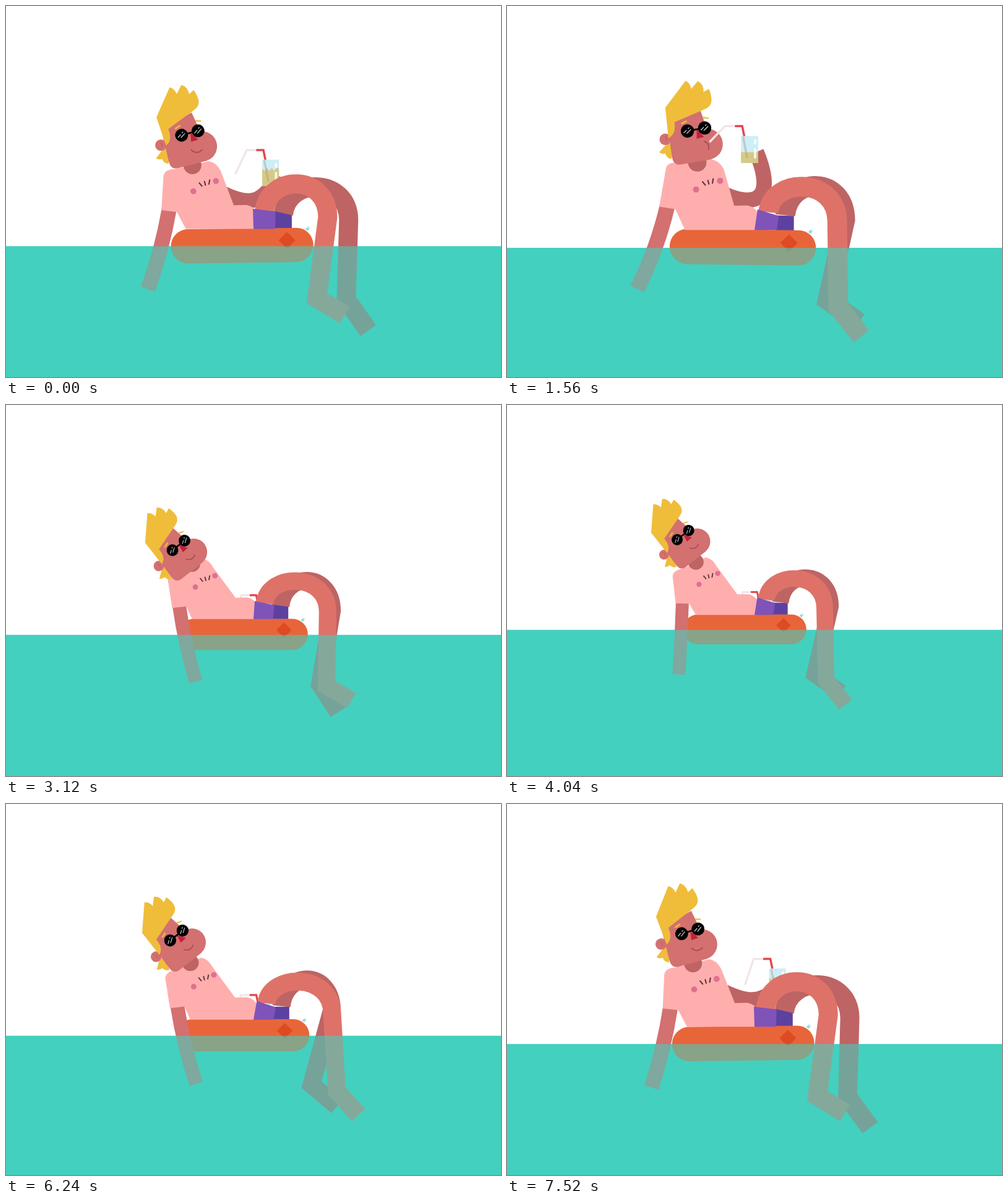
Recreate the animation shown at these times as an HTML page with a canvas. Size 800 px wide and 600 px high, loop 7.56 s.

```html
<!DOCTYPE html>
<html lang="en">
<head>
<meta charset="utf-8">
<title>Floating with a drink</title>
<style>
html, body { margin: 0; width: 100%; height: 100%; overflow: hidden; background: #fff; }
canvas { display: block; width: 800px; height: 600px; }
</style>
</head>
<body>
<canvas id="stage" width="800" height="600"></canvas>
<script>
const LOOP = 7560, KICK = LOOP / 3, SWING = LOOP / 2, TAU = Math.PI * 2;
const ctx = document.getElementById('stage').getContext('2d');
const C = {
  water: '#44d1c0', skin: '#d37070', near: '#de7269', far: '#be6464', shirt: '#ffaeae',
  hair: '#efbd3a', ring: '#e8653a', patch: '#de4a22', shorts: '#7f53b8', farShorts: '#5d41a0',
  red: '#e04850', straw: '#f2e4e6', nose: '#c5203a', blush: '#df7090'
};

const mix = (a, b, k) => a + (b - a) * k;
const clamp = v => Math.max(0, Math.min(1, v));
const smooth = v => (v = clamp(v), v * v * (3 - 2 * v));
const since = (t, from) => (t - from + LOOP) % LOOP;

// Eases up after `rise`, holds across the loop's seam, eases down after `fall`.
function hold(t, rise, riseTime, fall, fallTime) {
  return t >= fall ? Math.max(1 - smooth((t - fall) / fallTime), smooth((t - rise) / riseTime))
    : smooth((t + LOOP - rise) / riseTime);
}

function fill(color, draw) {
  ctx.beginPath();
  draw();
  ctx.fillStyle = color;
  ctx.fill();
}
function stroke(color, width, draw, cap = 'butt') {
  ctx.beginPath();
  draw();
  ctx.lineWidth = width;
  ctx.lineCap = cap;
  ctx.strokeStyle = color;
  ctx.stroke();
}
function trace(...p) {
  ctx.moveTo(p[0], p[1]);
  for (let i = 2; i < p.length; i += 2) ctx.lineTo(p[i], p[i + 1]);
}
const poly = (color, ...p) => fill(color, () => trace(...p));
const line = (color, width, ...p) => stroke(color, width, () => trace(...p));
const disc = (color, x, y, r) => fill(color, () => ctx.arc(x, y, r, 0, TAU));
function placed(x, y, degrees, draw) {
  ctx.save();
  ctx.translate(x, y);
  ctx.rotate(degrees / 360 * TAU);
  draw();
  ctx.restore();
}

// Scenery units: x from the middle of the stage, y from the waterline.
function pose(t) {
  const cos = Math.cos(t / KICK * TAU), sin = Math.sin(t / KICK * TAU);
  const wave = (mean, c, s) => mean + c * cos + s * sin;
  const up = hold(t, 6700, 1300, 2200, 800), back = 1 - up;
  const lift = hold(t, 7306, 400, 2220, 730);
  const bounce = Math.max(0, since(t, 2200) - 800);
  const dip = 18 * back * Math.exp(-bounce / 900) * Math.cos(bounce / 3060 * TAU);
  const swing = Math.cos((t - 6500) / SWING * TAU), reach = Math.sqrt(up);
  const grow = clamp(since(t, 3800) / 4800) ** 1.2;
  const zoom = wave(t > 2300 && t < 3800 ? 1 - .16 * smooth((t - 2300) / 1200) : .84 + .16 * grow, .008, 0);
  return {
    zoom, lift, kick: clamp(.5 - cos / 2),
    water: wave(365 + (zoom - .84) * 175, 1.2, 0),
    tilt: -up * cos,
    lean: back ** .6,
    head: { x: mix(-138, -95, up), y: mix(-180, -192.5, up) + dip, turn: -28.5 * back ** 1.3, sway: -36 * up * back - 4 * back },
    handX: mix(-129, -175, reach) + mix(29, 45, reach) * swing,
    handY: mix(86, 67, up),
    near: {
      knee: [wave(132, -8, 5), wave(-45, -4, 2)],
      ankle: [wave(127, -21, 9), wave(93, -6, 1)],
      foot: [wave(42.5, 4, 3), wave(36, -8, -8)]
    },
    far: {
      knee: [wave(150, 9, -6), wave(-45, 1, 0)],
      ankle: [wave(130, 25, -10), wave(88, 1, 3)],
      foot: [wave(42, -5, -8), wave(45, 7, 6)]
    },
    glassX: mix(3, -22, lift) + 36 * Math.sin(Math.PI * lift),
    glassY: mix(-57, -182, lift),
    sip: clamp((lift - .72) * 6),
    level: t > 4000 ? .66 : mix(.66, .3, clamp((t - 300) / 1750))
  };
}

function leg(color, hipX, hipY, { knee: [kx, ky], ankle: [ax, ay], foot: [fx, fy] }) {
  const top = ky - 72;
  stroke(color, 32, () => {
    ctx.moveTo(hipX, hipY);
    ctx.bezierCurveTo(hipX + 7, top, kx - 1, top, kx, ky);
    ctx.lineTo(ax, ay);
    ctx.lineTo(ax + fx, ay + fy);
  });
}

function drinkArm({ glassX, glassY }) {
  const hx = glassX + 25, hy = glassY + 26, drop = clamp((glassY + 127) / 60);
  stroke(C.far, 25, () => {
    ctx.moveTo(-50 - 12 * drop, -88 + 48 * drop);
    ctx.bezierCurveTo(-10, -69 + 39 * drop, 40 - (hx - 2) * .65, -68 + 41 * drop, hx, hy);
  });
}

function glass({ glassX, glassY, lift, level }) {
  placed(glassX, glassY, 0, () => {
    const top = 44 * (1 - level), slosh = level > .64 ? 4 : 0, len = 46 - 10 * lift ** 6;
    placed(-26, -16, mix(97, 134, lift * lift), () => line(C.straw, 3.4, 0, 0, len, 0));
    line(C.straw, 3.4, -27, -16, -10, -16);
    line(C.red, 3.6, -10, -16, 2, -16, 5.5, 1);
    ctx.globalAlpha = .88;
    fill('#c6ecf5', () => ctx.rect(0, 0, 28, 44));
    fill('#d6c677', () => {
      trace(28, 44, 0, 44, 0, top);
      for (let i = 1; i < 7; i++) ctx.lineTo(i * 4, top + (i % 2 ? slosh : -slosh * .4));
      ctx.lineTo(28, top);
    });
    ctx.globalAlpha = .4;
    line('#b08c88', 3.4, 3.5, 1, 10, 36);
    ctx.globalAlpha = .8;
    stroke('#fff', 4, () => { trace(23, 7, 23, 12); trace(23, 22, 23, 35); }, 'round');
    ctx.globalAlpha = 1;
  });
}

function torso({ lean, handX, handY }) {
  const sx = -139 + (handX + 145) * .06, sy = mix(-65, -51, lean), slant = (handX + 140) * .04;
  const bx = mix(-144, -158, lean), by = mix(-129, -104, lean);
  const rx = mix(-70, -94, lean * lean), ry = mix(-144, -140, lean);
  stroke(C.skin, 25, () => {
    ctx.moveTo(sx, sy - 3);
    ctx.quadraticCurveTo(mix(sx, handX, .33), mix(sy, handY, .5), handX, handY);
  });
  fill(C.shirt, () => {
    ctx.moveTo(sx - 13, sy + slant);
    ctx.lineTo(bx, by);
    ctx.quadraticCurveTo(bx + 2, by - 11, bx + 19, by - mix(9, 14, lean));
    ctx.lineTo(rx, ry);
    ctx.quadraticCurveTo(rx + 13, ry + 2, rx + 20, ry + 16);
    ctx.lineTo(-33, -68.5);
    ctx.lineTo(-12, -69);
    ctx.quadraticCurveTo(0, -67, 6, -57);
    ctx.lineTo(2, -29);
    ctx.lineTo(-113, -29);
    ctx.lineTo(sx + 13, sy - slant);
  });
  const x1 = mix(-95, -107, lean), y1 = mix(-95, -88, lean), x2 = mix(-56, -71, lean), y2 = -109;
  disc(C.blush, x1, y1, 5);
  disc(C.blush, x2, y2, 5);
  placed((x1 + x2) / 2, (y1 + y2) / 2, 0, () => {
    for (let i = -1; i < 2; i++) line('#5c2b2c', 2, i * 9 - .5, -8.5 - i * 2.5, i * 5.5 + 1.5, -1 - i * 1.5);
  });
  disc(C.far, mix(-93, -113, lean), mix(-139, -131, lean), 15);
}

function hair() {
  fill(C.hair, () => {
    ctx.moveTo(-50, -35.5);
    ctx.lineTo(-17, -79.5);
    ctx.quadraticCurveTo(-9, -75, -8, -66);
    ctx.lineTo(3, -79);
    ctx.quadraticCurveTo(13, -73, 12, -61);
    ctx.lineTo(21, -66);
    ctx.quadraticCurveTo(26, -53, 25, -46);
    ctx.quadraticCurveTo(24, -37, 14, -33);
    ctx.lineTo(-35, -12);
    ctx.quadraticCurveTo(-32, 8, -45, 14);
  });
}

function shades() {
  line('#000', 3, -14, 0, 14, 0);
  for (const x of [-14.2, 14.2]) {
    disc('#000', x, 0, 10.8);
    placed(x, 0, -35, () => {
      line('#ddd', 1.2, -7, -2, 0, -2);
      line('#ddd', 1.2, 3, -2, 6, -2);
      line('#ddd', 1.2, -4, 2, 6, 2);
    });
  }
}

function head({ head: { x, y, turn, sway }, sip }) {
  placed(x, y, turn, () => {
    fill(C.hair, () => {
      ctx.moveTo(-46, 22);
      ctx.lineTo(-60, 37);
      ctx.quadraticCurveTo(-55, 41, -50, 39);
      ctx.quadraticCurveTo(-48, 47, -40, 48);
      ctx.lineTo(-36, 24);
    });
    disc(C.skin, -50, 16, 9.5);
    stroke(C.far, 1.5, () => ctx.arc(-53, 16, 5, -1.2, .8));
    fill(C.skin, () => {
      ctx.moveTo(-47, -10);
      ctx.lineTo(-39, 45);
      ctx.quadraticCurveTo(-37, 58, -26, 57);
      ctx.lineTo(25, 48.5);
      ctx.arc(18.5, 24, 25, 1.33, -1.6, true);
      ctx.lineTo(6, -34);
      ctx.lineTo(-36, -16);
    });
    placed(-20, -10, sway, () => {
      ctx.translate(20, 10);
      hair();
    });
    poly(C.hair, -25, -10, -16, -15, -14, -13, -23, -8);
    poly(C.hair, 11, -21, 21, -19, 20, -17, 12, -18);
    poly(C.nose, 1, 0, 13, 12, 1, 15);
    placed(0, 0, -10, shades);
    stroke('#a94b50', 1.8, () => {
      ctx.moveTo(mix(-.6, 13, sip), mix(28, 19, sip));
      ctx.quadraticCurveTo(mix(9, 23, sip), mix(38, 23, sip), mix(18.5, 20, sip), mix(29, 33, sip));
    });
  });
}

function ring(tilt) {
  placed(-19, -1, tilt, () => {
    fill(C.ring, () => ctx.roundRect(-119, -28.7, 238, 57.4, 28.7));
    poly(C.patch, 75, -22, 89, -8, 75, 6, 61, -8);
    placed(110, -27, 43, () => {
      fill('#cdeef2', () => ctx.rect(-2.5, -4, 5, 7));
      fill('#7fdcd8', () => ctx.rect(-2, -1, 4, 4));
    });
  });
}

function render(t) {
  const p = pose(t), hem = mix(58, 51, p.kick), sipping = p.sip > 0;
  const sea = () => {
    ctx.fillStyle = C.water;
    ctx.fillRect(0, p.water, 800, 600);
  };
  ctx.clearRect(0, 0, 800, 600);
  sea();
  placed(400, p.water, 0, () => {
    ctx.scale(p.zoom, p.zoom);
    drinkArm(p);
    if (!sipping) glass(p);
    leg(C.far, 50, -53, p.far);
    poly(C.farShorts, 34, -hem - 1, 64, -52, 64, -27, 34, -27);
    leg(C.near, mix(18, 23, p.kick), -58, p.near);
    ring(p.tilt);
    torso(p);
    poly(C.shorts, mix(-1, 6, p.kick), -62.5, mix(37, 40, p.kick), -hem, 36, -29, 0, -29);
    head(p);
    if (sipping) glass(p);
  });
  ctx.globalAlpha = .58;
  sea();
  ctx.globalAlpha = 1;
}

const start = performance.now();
function frame() {
  render((performance.now() - start) % LOOP);
  requestAnimationFrame(frame);
}
frame();
</script>
</body>
</html>
```
